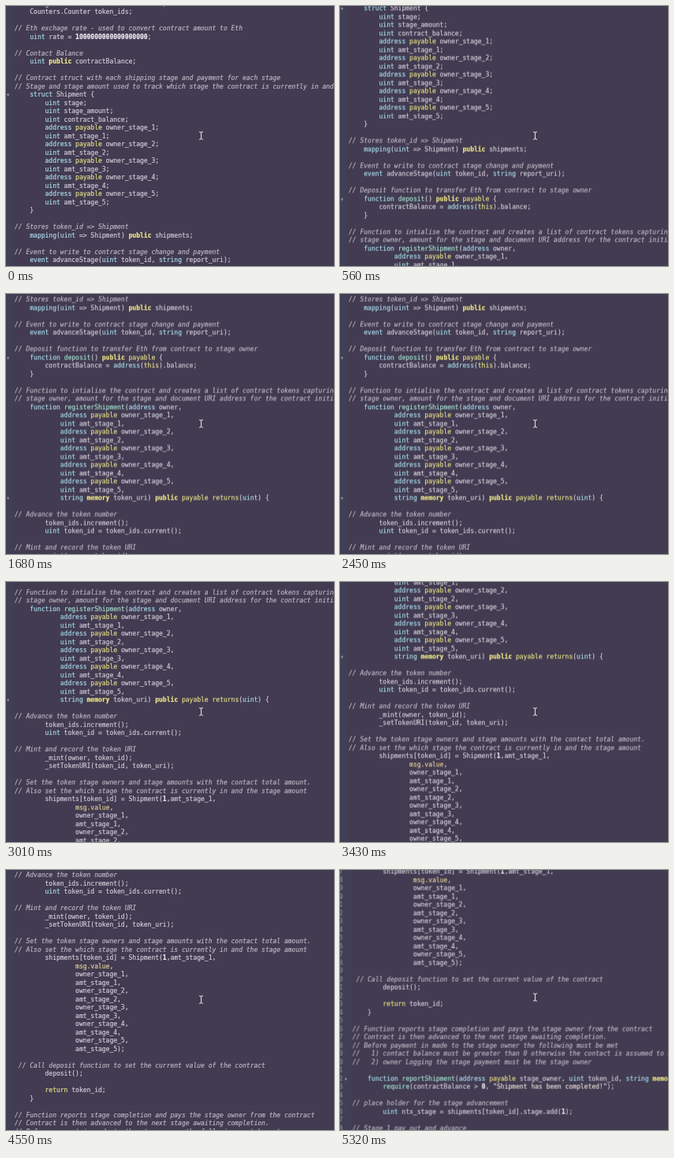
Recreate the animation shown at these times as an HTML page. Size 416 by 330 pixels, loop 5.39 s.

```html
<!DOCTYPE html>
<html lang="en">
<head>
<meta charset="utf-8">
<title>Scrolling contract code</title>
<style>
  html, body { margin: 0; width: 100%; height: 100%; overflow: hidden; background: #423b51; }
  #stage { position: relative; width: 416px; height: 330px; overflow: hidden; background: #423b51; }
  #editor { position: absolute; inset: 0; animation: widen 5390ms step-end infinite; }
  #gutter { position: absolute; left: -8px; top: 0; width: 17px; height: 330px; background: #3f4056; }
  #code {
    --notch: -54.7px;
    position: absolute; left: 11px; top: -7.2px; margin: 0;
    font: 8px/10.5px "DejaVu Sans Mono", monospace;
    -webkit-text-stroke: .18px;
    color: #d2ccd9; counter-reset: line 13;
    animation: wheel 5390ms step-end infinite;
  }
  .row { position: relative; height: 10.5px; white-space: pre; counter-increment: line; }
  .row::before {
    content: counter(line); position: absolute; right: 100%; margin-right: 12.3px; color: #8d879b;
  }
  .fold::after { content: "▾"; position: absolute; left: -10.5px; top: 0; font-size: 7px; color: #aaa4b5; }
  .comment { font-style: italic; color: #bdb7c5; }
  .type { color: #a9dcec; }
  .mod { color: #e6df86; }
  .bold { color: #efe88a; font-weight: bold; }
  .name { color: #a6e2cf; }
  .global { color: #e5cf98; }
  .num { color: #efebf2; font-weight: bold; }
  .str { color: #e4e0d6; }
  #pointer {
    position: absolute; left: 243.5px; top: 158.5px;
    fill: none; stroke: #dedae4; stroke-width: 1.1;
    animation: nudge 5390ms step-end infinite;
  }
  @keyframes wheel {
    0%    { transform: translateY(0); }
    5.1%  { transform: translateY(var(--notch)); }
    10.3% { transform: translateY(calc(var(--notch) * 2)); }
    15.5% { transform: translateY(calc(var(--notch) * 3)); }
    22%   { transform: translateY(calc(var(--notch) * 4)); }
    28.5% { transform: translateY(calc(var(--notch) * 5)); }
    48%   { transform: translateY(calc(var(--notch) * 6)); }
    53.2% { transform: translateY(calc(var(--notch) * 7)); }
    59.7% { transform: translateY(calc(var(--notch) * 8)); }
    67.5% { transform: translateY(calc(var(--notch) * 9)); }
    84.4% { transform: translateY(calc(var(--notch) * 10)); }
    90.9% { transform: translateY(calc(var(--notch) * 11)); }
    96%   { transform: translateY(calc(var(--notch) * 12)); }
  }
  /* the gutter grows by one character once line 100 is in view */
  @keyframes widen {
    0% { transform: none; }
    90.9% { transform: translateX(4.8px); }
  }
  @keyframes nudge {
    0% { transform: none; }
    90.9% { transform: translateY(-3px); }
  }
</style>
</head>
<body>
<div id="stage">
  <div id="editor">
    <div id="gutter"></div>
    <div id="code"></div>
  </div>
  <svg id="pointer" width="7" height="11" viewBox="0 0 7 11">
    <path d="M1 .8Q3 .8 3.5 1.8Q4 .8 6 .8M3.5 1.8V9.2M1 10.2Q3 10.2 3.5 9.2Q4 10.2 6 10.2"/>
  </svg>
</div>
<script>
  // One owner line and one amount line per shipping stage
  const stages = (indent, owner, amount, end) =>
    [1, 2, 3, 4, 5]
      .map(n => `${indent}${owner}owner_stage_${n}${end}\n${indent}${amount}amt_stage_${n}${end}`)
      .join('\n');
  const pad = n => ' '.repeat(n);

  const source = `    using Counters for Counters.Counter;
    Counters.Counter token_ids;

// Eth exchage rate - used to convert contract amount to Eth
    uint rate = 1000000000000000000;

// Contact Balance
    uint public contractBalance;

// Contract struct with each shipping stage and payment for each stage
// Stage and stage amount used to track which stage the contract is currently in and
    struct Shipment {
        uint stage;
        uint stage_amount;
        uint contract_balance;
${stages(pad(8), 'address payable ', 'uint ', ';')}
    }

// Stores token_id => Shipment
    mapping(uint => Shipment) public shipments;

// Event to write to contract stage change and payment
    event advanceStage(uint token_id, string report_uri);

// Deposit function to transfer Eth from contract to stage owner
    function deposit() public payable {
        contractBalance = address(this).balance;
    }

// Function to intialise the contract and creates a list of contract tokens capturing
// stage owner, amount for the stage and document URI address for the contract initialise
    function registerShipment(address owner,
${stages(pad(12), 'address payable ', 'uint ', ',')}
            string memory token_uri) public payable returns(uint) {

// Advance the token number
        token_ids.increment();
        uint token_id = token_ids.current();

// Mint and record the token URI
        _mint(owner, token_id);
        _setTokenURI(token_id, token_uri);

// Set the token stage owners and stage amounts with the contact total amount.
// Also set the which stage the contract is currently in and the stage amount
        shipments[token_id] = Shipment(1,amt_stage_1,
                msg.value,
${stages(pad(16), '', '', ',').slice(0, -1)});

 // Call deposit function to set the current value of the contract
        deposit();

        return token_id;
    }

// Function reports stage completion and pays the stage owner from the contract
// Contract is then advanced to the next stage awaiting completion.
// Before payment in made to the stage owner the following must be met
//   1) contact balance must be greater than 0 otherwise the contact is assumed to be
//   2) owner Logging the stage payment must be the stage owner

    function reportShipment(address payable stage_owner, uint token_id, string memory
        require(contractBalance > 0, "Shipment has been completed!");

// place holder for the stage advancement
        uint ntx_stage = shipments[token_id].stage.add(1);

// Stage 1 pay out and advance`;

  const rules = {
    comment: /\/\/.*/,
    str: /"[^"]*"/,
    type: /\b(?:uint|address|string|mapping|struct|event|function|using|for)\b/,
    mod: /\b(?:payable|this|return|returns)\b/,
    bold: /\b(?:public|memory)\b/,
    name: /\b(?:registerShipment|reportShipment|require)\b|\bdeposit(?=\(\) p)/,
    global: /\bmsg\.value\b/,
    num: /\b\d+\b/
  };
  const lexer = new RegExp(
    Object.entries(rules).map(([kind, rule]) => `(?<${kind}>${rule.source})`).join('|'), 'g');

  function element(tag, className, text) {
    const node = document.createElement(tag);
    node.className = className;
    if (text) node.textContent = text;
    return node;
  }

  function renderRow(line) {
    const row = element('div', /\{$|function reportS/.test(line) ? 'row fold' : 'row');
    let at = 0;
    for (const match of line.matchAll(lexer)) {
      const kind = Object.keys(rules).find(k => match.groups[k] !== undefined);
      row.append(line.slice(at, match.index), element('span', kind, match[0]));
      at = match.index + match[0].length;
    }
    row.append(line.slice(at));
    return row;
  }

  document.getElementById('code').append(...source.split('\n').map(renderRow));
</script>
</body>
</html>
```
